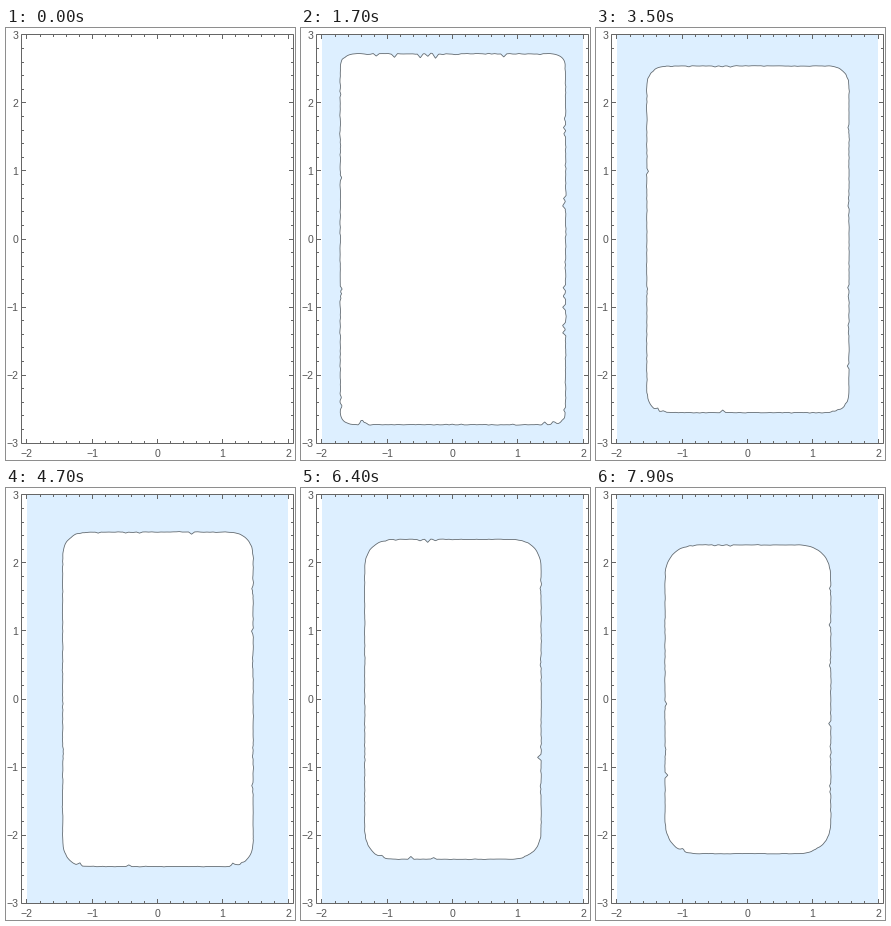
Animation, 289 px wide and 432 px high, one loop 8000 ms. Source, as a matplotlib script:

```python
import numpy as np
import matplotlib.pyplot as plt
from matplotlib.animation import FuncAnimation
from matplotlib.patches import Polygon, Rectangle

plt.rcParams["path.snap"] = False

W, H, DPI = 289, 432, 72
FRAMES, STEP = 80, 100
CX, CY, SX, SY = 151.5, 211, 65.25, 68
LEFT, RIGHT, TOP, BOTTOM = 15.5, 287.5, 6.5, 415.5
GRAY, BLUE = "#666666", "#DDEFFF"

# Places on the walls where the front snags, in axis units
SNAGS = [(-1.1, 3), (-0.3, 3), (2, 1.5), (2, 0.6), (2, -0.6), (2, -1.4),
         (1.5, -3), (-1.3, -3), (-2, -2.4), (-2, -0.9)]

seed = np.random.default_rng(4)
spots = np.repeat(SNAGS, 3, axis=0) + seed.normal(0, 0.12, (3 * len(SNAGS), 2))
spots = np.array([CX, CY]) + spots * [SX, -SY]
peaks = seed.uniform(2, 13, len(spots))


def depth(t):
    """Distance of the front from the walls: square-root growth, slow start."""
    warm = 0.8
    return np.sqrt(0.075 * (t - warm * (1 - np.exp(-t / warm))))


def rounded_box(a, b, r, power=2.4):
    """Points and inward normals of a box with superellipse corners."""
    center = np.array([CX + 0.4, CY + 0.3])
    turn = np.linspace(0, np.pi / 2, max(8, int(r)))
    pts, normals = [], []
    for k, (sx, sy) in enumerate([(1, 1), (-1, 1), (-1, -1), (1, -1)]):
        ang = turn + k * np.pi / 2
        out = np.column_stack([np.cos(ang), np.sin(ang)])
        bend = np.sign(out) * np.abs(out) ** (2 / power)
        arc = center + [sx * (a - r), sy * (b - r)] + r * bend
        # The straight side runs on to the next corner
        step = np.array([-2 * sx * (a - r), 0] if k % 2 == 0
                        else [0, -2 * sy * (b - r)])
        n = int(np.abs(step).sum() / 1.5)
        side = arc[-1] + np.linspace(0, 1, n)[1:-1, None] * step
        pts += [arc, side]
        normals += [-out, np.repeat(-out[-1:], n - 2, axis=0)]
    return np.vstack(pts), np.vstack(normals)


def front(i):
    rng = np.random.default_rng(100 + i)
    t = i * STEP / 1000
    d = depth(t)
    pts, normals = rounded_box((2 - d) * SX, (3 - d) * SY, 3 + 0.66 * d * SX)

    n = len(pts)
    coarse = rng.normal(0, 0.15 + 0.5 * np.exp(-t), n // 2 + 1)
    push = np.interp(np.arange(n), 2 * np.arange(len(coarse)), coarse)

    def spike(place, height):
        j = np.argmin(np.hypot(*(pts - place).T))
        gap = np.hypot(*(pts - pts[j]).T)
        push[:] += height * np.clip(1 - gap / 3, 0, 1)

    fade = np.exp(-(t / 1.5) ** 2) + 0.12
    for place, peak in zip(spots, peaks):
        spike(place, peak * fade * rng.uniform(0.5, 1))
    for j in rng.integers(0, n, 4):
        spike(pts[j], rng.uniform(1, 3))
    return pts + normals * push[:, None]


fig = plt.figure(figsize=(W / DPI, H / DPI), dpi=DPI, facecolor="white")
ax = fig.add_axes([0, 0, 1, 1])
ax.set(xlim=(0, W), ylim=(H, 0))
ax.axis("off")

water = ax.add_patch(Rectangle((21, 7), 261, 408, fc=BLUE, ec="none"))
ice = ax.add_patch(Polygon([(0, 0), (1, 0), (1, 1)], fc="white", ec="#5E666C",
                           lw=0.8, joinstyle="miter"))
ax.add_patch(Rectangle((LEFT, TOP), RIGHT - LEFT, BOTTOM - TOP, fc="none",
                       ec=GRAY, lw=1, joinstyle="miter", zorder=4))


def pixel(center, offset):
    """Middle of the pixel at an offset, rounded away from the center."""
    p = round(center + offset, 6)
    return (np.floor(p) if offset >= 0 else np.ceil(p) - 1) + 0.5


def line(x0, y0, x1, y1):
    ax.plot([x0, x1], [y0, y1], color=GRAY, lw=1, zorder=4,
            solid_capstyle="butt")


def label(x, y, v, ha):
    ax.text(x, y, str(v).replace("-", "\u2212"), ha=ha, va="baseline",
            family="Liberation Sans", size=10.5, color="#555555", zorder=5)


def tick_size(k):
    return 2.5 if k % 5 else 4.5


for k in range(-10, 11):
    x, size = pixel(CX, k / 5 * SX), tick_size(k)
    line(x, TOP, x, TOP + size)
    line(x, BOTTOM, x, BOTTOM - size)
    if k % 5 == 0:
        label(x - 0.5 * (k < 0), 428.6, k // 5, "center")
for k in range(-14, 15):
    y, size = pixel(CY, -k / 5 * SY), tick_size(k)
    line(LEFT, y, LEFT + size, y)
    line(RIGHT, y, RIGHT - size, y)
for v in range(-3, 4):
    label(12.5, CY - v * SY + 3.6, v, "right")


def update(i):
    water.set_visible(i > 0)
    ice.set_visible(i > 0)
    if i:
        ice.set_xy(front(i))
    return water, ice


anim = FuncAnimation(fig, update, frames=FRAMES, interval=STEP,
                     init_func=lambda: update(0), repeat=True, repeat_delay=0)
plt.show()
```
